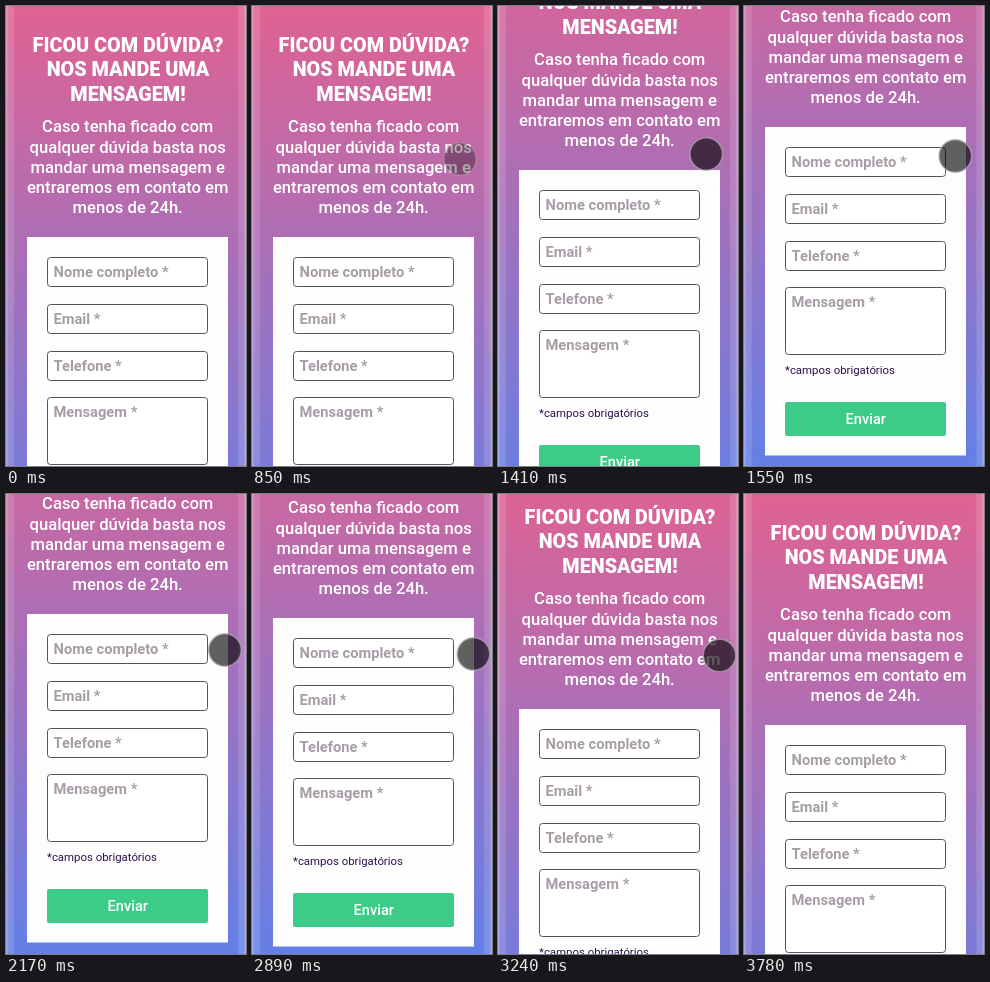
Recreate the animation shown at these times as an HTML page. Size 240 px wide and 460 px high, loop 4920 ms.

```html
<!DOCTYPE html>
<html lang="pt-BR">
<head>
<meta charset="utf-8">
<title>Formulário de contato</title>
<style>
  html, body { margin: 0; width: 100%; height: 100%; overflow: hidden; }
  svg { display: block; width: 240px; height: 460px; font-family: Roboto, sans-serif; }
  .title { font-size: 19.8px; font-weight: 900; }
  .lead { font-size: 16.65px; font-weight: 450; }
  .title, .lead, .send { fill: #fff; text-anchor: middle; }
  .label { font-size: 14.7px; font-weight: 700; fill: #a79da6; }
  .field { fill: #fff; stroke: #55525a; }
  .note { font-size: 11.4px; fill: #2c104a; }
  .send { font-size: 14.6px; font-weight: 450; }
</style>
</head>
<body>
<svg viewBox="0 0 240 460">
  <defs>
    <linearGradient id="sky" gradientUnits="userSpaceOnUse" x1="0" y1="0" x2="0" y2="575">
      <stop stop-color="#e06292"/><stop offset="1" stop-color="#6280e8"/>
    </linearGradient>
    <linearGradient id="edge">
      <stop stop-color="#fff" stop-opacity=".38"/>
      <stop offset=".3" stop-color="#fff" stop-opacity=".14"/>
      <stop offset=".75" stop-color="#fff" stop-opacity=".14"/>
      <stop offset="1" stop-color="#fff" stop-opacity="0"/>
    </linearGradient>
  </defs>
  <g id="page"><rect width="240" height="600" fill="url(#sky)"/></g>
  <rect width="9" height="460" fill="url(#edge)"/>
  <rect width="9" height="460" fill="url(#edge)" transform="translate(240) scale(-1 1)"/>
  <circle id="touch" r="16.3" fill="#000" fill-opacity=".62" stroke="#b0aab0" stroke-opacity=".7" stroke-width="1.6"/>
</svg>
<script>
const LOOP = 4920, TICK = 70, SCROLL = 111;
const page = document.getElementById('page');
const touch = document.getElementById('touch');

function add(tag, attrs, text = '') {
  const el = document.createElementNS('http://www.w3.org/2000/svg', tag);
  for (const key in attrs) el.setAttribute(key, attrs[key]);
  el.textContent = text;
  page.appendChild(el);
}
const write = (cls, x, y, text) => add('text', { class: cls, x, y }, text);
const box = (x, y, width, height, fill, rx = 0) => add('rect', { x, y, width, height, fill, rx });

['FICOU COM DÚVIDA?', 'NOS MANDE UMA', 'MENSAGEM!']
  .forEach((line, i) => write('title', 122, 45.5 + 24.8 * i, line));
['Caso tenha ficado com', 'qualquer dúvida basta nos', 'mandar uma mensagem e',
 'entraremos em contato em', 'menos de 24h.']
  .forEach((line, i) => write('lead', 121.7, 126.3 + 20.2 * i, line));

box(21, 231, 201, 328.5, '#fdfdfe');
['Nome completo *', 'Email *', 'Telefone *', 'Mensagem *'].forEach((name, i) => {
  const y = 251.5 + Math.round(46.8 * i);
  add('rect', { class: 'field', x: 41.5, y, width: 160, height: i < 3 ? 29 : 67, rx: 3 });
  write('label', 47.5, y + 19.5, name);
});
write('note', 41, 478, '*campos obrigatórios');
box(41, 506, 161, 34, '#3dcc88', 2);
write('send', 121.8, 528, 'Enviar');

// The picture advances in ticks counted from the start of each gesture.
const gestures = [0, 850, 1890, 2350, 2890, 3710];

function tick(time) {
  const start = gestures.filter(g => g <= time).pop();
  return start + TICK * Math.floor((time - start) / TICK);
}

function ramp(time, from, to) {
  return Math.min(1, Math.max(0, (time - from) / (to - from)));
}

function ease(time, from, to) {
  const p = ramp(time, from, to);
  return p * p * (3 - 2 * p);
}

function render(now) {
  const time = tick(now % LOOP);
  const scroll = SCROLL * (ease(time, 1200, 1570) - ease(time, 2826, 3368));
  const x = 208 + 8 * ramp(time, 1400, 1760) + 3 * ramp(time, 1890, 2170) + 2.5 * ramp(time, 2350, 2560);
  const y = 153 - 7 * ramp(time, 850, 990) + 4 * ramp(time, 1270, 1550) + 6 * ramp(time, 1890, 2170)
    + 4 * ramp(time, 2350, 2560) + 1.5 * ramp(time, 2890, 3240);

  page.setAttribute('transform', `translate(0 ${-Math.round(scroll)})`);
  touch.setAttribute('cx', x);
  touch.setAttribute('cy', y);
  touch.setAttribute('opacity', ramp(time, 780, 920) - ramp(time, 3640, 3780));
}

const origin = performance.now();
function loop() {
  render(performance.now() - origin);
  requestAnimationFrame(loop);
}
render(0);
requestAnimationFrame(loop);
</script>
</body>
</html>
```
